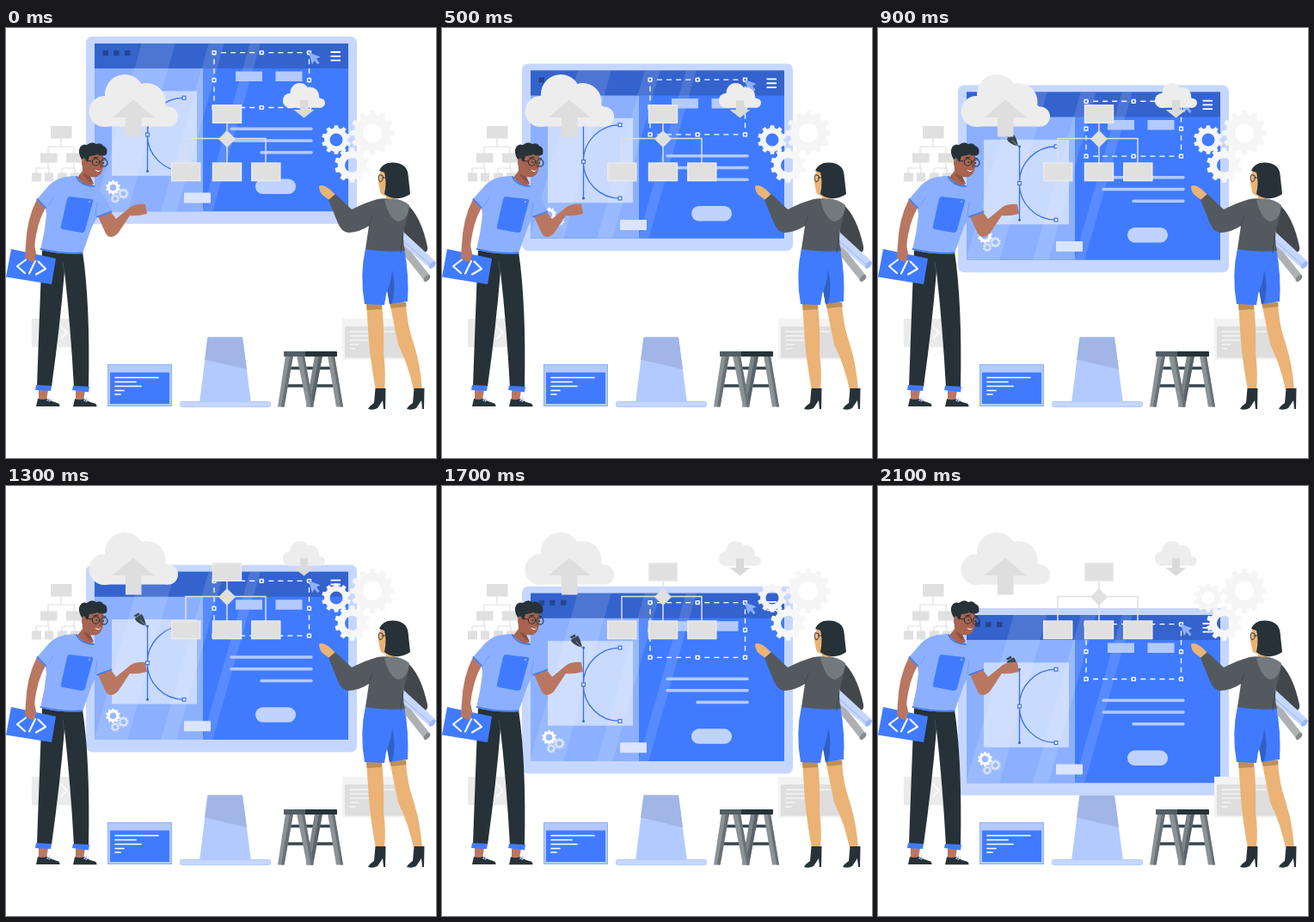
An HTML page that plays this animation: 500 px wide and 500 px high, repeating every 4100 ms.

```html
<!DOCTYPE html>
<html lang="en">
<head>
<meta charset="utf-8">
<title>Web design team</title>
<style>
html, body { margin: 0; width: 100%; height: 100%; overflow: hidden; background: #fff; }
svg { display: block; width: 100vw; height: 100vh; }
.line { fill: none; stroke-linecap: round; stroke-linejoin: round; }
</style>
</head>
<body>
<svg viewBox="0 0 500 500">
  <defs>
    <clipPath id="screen"><rect x="103" y="8" width="295" height="195.2"/></clipPath>
    <g id="cloud">
      <circle cx="114.5" cy="97" r="18"/><circle cx="138" cy="77" r="23"/>
      <circle cx="163.5" cy="86" r="22"/><circle cx="188.5" cy="103" r="11.5"/>
      <path d="M114 80H175L188 92V114.5H114Z"/>
    </g>
    <g id="shoe">
      <path fill="#b97761" d="M38 421H49L47 433H38Z"/>
      <path fill="#263238" d="M37 431Q42 433 48 431Q54 435 61 436.500Q63 438 62.500 440H35Z"/>
      <path class="line" stroke="#c6d7ff" stroke-width="1.300" d="M48 433L51 430M50 434L53 432"/>
    </g>
    <path id="boot" fill="#263238" d="M429.500 419H441.500L441 443H439L438 433L432 442Q427 445 421 443Q422 440 428 436Z"/>
  </defs>

  <!-- stand, floor window, stool -->
  <path fill="#b3caff" d="M234.500 359.500H275L285 436H225Z"/>
  <path fill="#a1b5e6" d="M234.500 359.500H275L280 397L231 385.500Z"/>
  <rect x="202.500" y="434.500" width="105" height="6" rx="2" fill="#c6d7ff" stroke="#b3caff"/>
  <rect x="118" y="391" width="75" height="49" fill="#8cb0ff"/>
  <rect x="119" y="392" width="73" height="47" fill="#b3caff"/>
  <rect x="121" y="400.500" width="69" height="36.500" fill="#407bff"/>
  <path class="line" stroke="#fff" stroke-width="1.700" d="M127 406.500H177M127 411.500H151M127 416.500H157M127 421.500H137M127 426H133"/>
  <path stroke="#37474f" stroke-width="3.500" d="M331 395.500H379M327 416H383"/>
  <path fill="#7c8488" d="M359 381H368L357 440.500H349Z"/>
  <path fill="#596369" d="M364 381H368L357 440.500H353Z"/>
  <path fill="#8b9295" d="M325 381H334L323.500 440.500H316ZM338 381H347L357.500 440.500H350ZM374 381H382L392 440.500H384Z"/>
  <path fill="#687176" d="M330 381H334L323.500 440.500H320ZM344 381H347L357.500 440.500H354.500ZM379 381H382L392 440.500H389Z"/>
  <rect x="323" y="376" width="62" height="6" rx="1" fill="#263238"/>
  <path fill="#535e64" d="M324 376H348V382H324Q323 382 323 381V377Q323 376 324 376Z"/>

  <!-- faint wall pieces -->
  <path class="line" stroke="#e0e0e0" stroke-width="1.200" d="M64 128V138M49 146V138H79V146M49 156V163M35 169V163H50V169M79 156V163M65 169V163H80V169"/>
  <path fill="#e0e0e0" d="M52 114H76.500V128.500H52ZM40 145.500H59.500V156.500H40ZM70 145.500H89.500V156.500H70ZM30 168.500H41V178.500H30ZM45 168.500H55V178.500H45ZM60 168.500H71V178.500H60ZM75 168.500H86V178.500H75Z"/>
  <rect x="30" y="338" width="47" height="33" fill="#ebebeb"/>
  <path class="line" stroke="#fafafa" stroke-width="2" d="M64 347L71 354L64 361"/>

  <!-- sinking monitor, y measured from its top edge -->
  <g id="monitor">
    <rect x="93" width="315" height="217.700" rx="7" fill="#c6d7ff"/>
    <g clip-path="url(#screen)">
      <path fill="#407bff" d="M103 7H398V204H103Z"/>
      <path fill="#8cb0ff" d="M103 36H229V204H103Z"/>
      <path fill="#3463cd" d="M103 7H398V37H103Z"/>
      <path fill="#fff" fill-opacity=".12" d="M158 7H197L141 204H102ZM236 7H254L198 204H180ZM284 7H296L240 204H228Z"/>
    </g>
    <path fill="#24468f" d="M112.500 16H119V22H112.500ZM125 16H131.500V22H125ZM138 16H144.500V22H138Z"/>
    <path stroke="#fff" stroke-width="1.800" d="M377.500 18H389M377.500 22.800H389M377.500 27.600H389"/>
    <rect x="123" y="63.300" width="99" height="98.500" fill="#fff" fill-opacity=".53"/>
    <path class="line" stroke="#3a70e6" stroke-width="1.300" d="M164.500 71.200V156.600M207 71.200A42.700 42.700 0 0 0 207 156.600"/>
    <g fill="#3463cd"><circle cx="164.500" cy="71.200" r="1.500"/><circle cx="164.500" cy="156.600" r="1.500"/></g>
    <g id="curveHandles" fill="#fff" stroke="#3a70e6" stroke-width="1.200"></g>
    <path fill="#37474f" d="M148.500 59L151 60.500L150 63Q152 68 163 71Q161 61 158 57.500L155.500 58L154.500 55.500Z"/>
    <path class="line" stroke="#aebfe6" stroke-width=".7" d="M151 61L156 58M156 64L163 71"/>
    <path id="whiteGear" fill="#fff"/>
    <path id="paleGears" fill="#d9e4ff"/>
    <rect x="207" y="181.500" width="31" height="12" rx="1" fill="#dbe5ff"/>
    <path fill="#b3caff" d="M267 40.500H298V52H267ZM313.500 40.500H344.500V52H313.500Z"/>
    <path class="line" stroke="#b3caff" stroke-width="3.500" d="M262 107.300H355M262 121H355M297 134.700H355"/>
    <rect x="290" y="165.500" width="47" height="17.500" rx="8.700" fill="#c0d3ff"/>
    <g stroke="#fff" stroke-width="1.300" stroke-dashoffset="3">
      <path stroke-dasharray="6 5.050" d="M242 18.700H352.500M242 82.500H352.500"/>
      <path stroke-dasharray="6 4.630" d="M242 18.700V82.500M352.500 18.700V82.500"/>
    </g>
    <g id="frameHandles" fill="#407bff" stroke="#fff" stroke-width="1.300"></g>
    <path fill="#8cb0ff" d="M352 18.500L365.500 23.500L361 26L364.500 30.500L362.500 32.500L358.500 28L356 32.500Z"/>
  </g>

  <!-- clouds, flow chart, gears, pale window -->
  <use href="#cloud" fill="#ededed"/>
  <path fill="#dedede" d="M148 83.500L172.500 104H157.500V126.500H139V104H123.500Z"/>
  <use href="#cloud" fill="#ededed" transform="translate(276 38.300) scale(.475)"/>
  <path fill="#dadada" d="M342 84H351V95H358.500L346.500 104.500L334.500 95H342Z"/>
  <path fill="none" stroke="#e0e0e0" stroke-width="1.500" d="M257 110V157M209 157V128.500H302V157"/>
  <path fill="#e0e0e0" d="M257 119L267 129L257 139L247 129Z"/>
  <g id="flowBoxes" fill="#e0e0e0" stroke="#ebebeb" stroke-width="1.500"></g>
  <path id="largeGears" fill="#f5f5f5"/>
  <path id="frontGear" fill="#f7f7f7"/>
  <rect x="391" y="338" width="75" height="47.500" fill="#f3f3f3"/>
  <rect x="394" y="347" width="70" height="36.500" fill="#dedede"/>
  <path class="line" stroke="#f5f5f5" stroke-width="1.500" d="M400 353H451M400 358H424M400 363H430M400 368H410M400 373H406"/>

  <!-- man -->
  <use href="#shoe"/><use href="#shoe" x="43" y=".3"/>
  <path fill="#263238" d="M42 257Q65 263 89 260Q98 320 96 418H79Q75 345 68 283Q63 345 53 417H36Q39 330 42 257Z"/>
  <path class="line" stroke="#455a64" stroke-width=".7" d="M68 287L66 272"/>
  <path fill="#407bff" d="M35 415L53 416L52 422L34 421ZM78 416L97 417L96 423.500L77 421Z"/>
  <path fill="#b97761" d="M36 199L46 209Q36 226 33 254L23 253Q24 222 36 199Z"/>
  <path fill="#407bff" d="M6 257L58 268L53 298L0 289.500Z"/>
  <path class="line" stroke="#fff" stroke-width="2.100" d="M23 269.500L13 277L22 285M34 271L27 285.500M37.500 271.500L46 280L35 286.500"/>
  <path fill="#b97761" d="M23 251L33 252L35 262L33 272L28 271L22 267Z"/>
  <path fill="#b97761" d="M107 219L122 214L128 222L145 208Q152 204 162 205L164 216Q153 219 144 218L130 239Q121 247 116 239Z"/>
  <path fill="#8cb0ff" d="M82 172Q60 172 50 183L36 199L46 210L47 218Q45 238 40 258Q65 264 89 262L100 231L107 218L123 213Q114 190 102 183Z"/>
  <path class="line" stroke="#407bff" stroke-width="1.800" d="M40.500 257Q65 263 88.500 261.500M36.500 199L46 209M106 219.500L122.500 213.500M82 173Q86 183 102 184"/>
  <path class="line" stroke="#6b96f2" stroke-width=".8" d="M49 207L55 197M104 218L106 203"/>
  <path fill="#407bff" d="M74 196L99 199Q102 199 101 202L92 235Q91 238 88 238L66 234Q63 233 64 230L71 199Q72 196 74 196Z"/>
  <circle cx="97" cy="202" r="1.200" fill="#8cb0ff"/>
  <path fill="#a76450" d="M88 146L112 145Q115 156 112 165Q110 173.500 102 173.500L98 173L102 181Q95 187 83 174L89 166Z"/>
  <path fill="#8d5141" d="M98 173L90 169Q93 178 101 180Z"/>
  <path fill="#263238" d="M88 153Q83 144 86 139Q89 134 94 136Q100 131 105 135Q111 133 113 137Q119 139 117 147Q112 150 106 147Q100 149 97 149L95 156L91 151Z"/>
  <ellipse cx="91" cy="157" rx="3" ry="4" fill="#a76450"/>
  <g class="line" stroke="#263238" stroke-width="1.100">
    <circle cx="104.500" cy="156" r="4.200"/><circle cx="114" cy="157" r="4"/>
    <path d="M100.500 155L93 154M102 151L107 150M112 151L116 152"/>
  </g>
  <g fill="#263238"><circle cx="105.500" cy="156" r="1"/><circle cx="113" cy="157" r="1"/></g>
  <path class="line" stroke="#7d4034" stroke-width=".8" d="M110 157L112 161L109 162"/>
  <path fill="#fff" d="M103 164.500Q107 167 110.500 165Q107 169.500 103 164.500Z"/>

  <!-- woman -->
  <path fill="#42474b" d="M465 204Q482 217 490 254Q491 261 486 261L462 242Z"/>
  <path fill="#aeb1b3" d="M460 246L493 288L487 294.500L458 258Z"/>
  <ellipse cx="489.500" cy="291" rx="2.600" ry="4.800" transform="rotate(42 489.500 291)" fill="#858a8d"/>
  <path fill="#c6d7ff" d="M462 237L499 271L493 279.500L460 251Z"/>
  <path class="line" stroke="#8ca8e6" stroke-width=".8" d="M461 247L493 275"/>
  <ellipse cx="496" cy="275.500" rx="2.600" ry="5" transform="rotate(40 496 275.500)" fill="#9bb8f5"/>
  <path fill="#ebb376" d="M364 184Q368 181 377 188L383 194L376 200L369 195Q364 191 364 184Z"/>
  <path fill="#ebb376" d="M419 319H437Q440 350 439 379Q442 400 440 421H430Q424 389 422 365ZM446 319H465Q466 345 475 370Q482 393 484 421H474Q468 392 456 368Z"/>
  <path fill="#bd8f58" d="M419 320H437V327L419.500 328ZM446 320L465 319L465.500 324L448 326Z"/>
  <use href="#boot"/><use href="#boot" x="45"/>
  <path fill="#407bff" d="M418 256H463Q469 288 467 318L446 321L443 304L440 322L417 321Q411 288 418 256Z"/>
  <path fill="#3060c4" d="M441 310Q448 298 449 281Q454 302 449 320L446 321L443 304Z"/>
  <path fill="#ebb376" d="M436 163L451 162L453 202L442 199V195Q436 195 435 190L433 180Z"/>
  <path fill="#53595e" d="M432 199Q447 196 467 205Q470 213 464 230Q460 244 464 259Q440 261 418 257L422 230Q412 237 398 238Q390 237 386 227L375 200L383 193L402 211Q420 202 432 199Z"/>
  <path class="line" stroke="#3d4347" stroke-width=".8" d="M422 230L426 218M459 261L461 241"/>
  <path fill="#737a7e" d="M440 200Q456 195 469 206Q468 222 457 225Q446 224 440 200Z"/>
  <path class="line" stroke="#263238" stroke-width="1" d="M434 171Q432 176 435 179Q439 178 438 172ZM438 174H445"/>
  <path fill="#263238" d="M434 166Q438 156 450 156.500Q466 157 467.500 170L470 193Q462 199 452 198Q444 197 440 193Q443 178 440 168Z"/>
</svg>
<script>
const byId = id => document.getElementById(id);
const monitor = byId("monitor");

// Toothed ring with a round hole; the hole winds the opposite way.
function gear(cx, cy, outer, hole, teeth) {
  const points = [];
  const root = outer * 0.82;
  for (let i = 0; i < teeth; i++) {
    for (const [offset, radius] of [[-0.3, root], [-0.2, outer], [0.2, outer], [0.3, root]]) {
      const angle = (i + offset) / teeth * 2 * Math.PI - Math.PI / 2;
      points.push(`${cx + radius * Math.cos(angle)} ${cy + radius * Math.sin(angle)}`);
    }
  }
  return `M${points.join("L")}Z M${cx + hole} ${cy}` +
    `a${hole} ${hole} 0 1 0 ${-2 * hole} 0a${hole} ${hole} 0 1 0 ${2 * hole} 0Z`;
}

function addRects(id, centers, width, height) {
  byId(id).innerHTML = centers.map(([x, y]) =>
    `<rect x="${x - width / 2}" y="${y - height / 2}" width="${width}" height="${height}"/>`).join("");
}

byId("whiteGear").setAttribute("d", gear(124.5, 175.5, 8.5, 3.8, 10));
byId("paleGears").setAttribute("d", gear(136.5, 182.5, 6.3, 2.8, 10) + gear(127, 188.5, 5.2, 2.3, 10));
byId("largeGears").setAttribute("d", gear(426, 122, 26, 11, 12) + gear(384, 130, 17, 7.5, 10));
byId("frontGear").setAttribute("d", gear(402.5, 159.5, 20.5, 8.5, 10));
addRects("curveHandles", [[207, 71.2], [164.5, 114], [207, 156.6]], 3.8, 3.8);
addRects("frameHandles", [242, 297.2, 352.5].flatMap(x =>
  [18.7, 50.6, 82.5].map(y => [x, y])).filter((_, i) => i !== 4), 3.8, 3.8);
addRects("flowBoxes", [[257, 100], [209.2, 167.3], [257, 167.3], [302.3, 167.3]], 33, 20.5);

// The monitor sinks in 21 even steps, then rests for two seconds.
function draw() {
  const step = Math.min(21, Math.floor(performance.now() % 4100 / 100));
  monitor.setAttribute("transform", `translate(0 ${10 + step * 132 / 21})`);
  requestAnimationFrame(draw);
}
draw();
</script>
</body>
</html>
```
